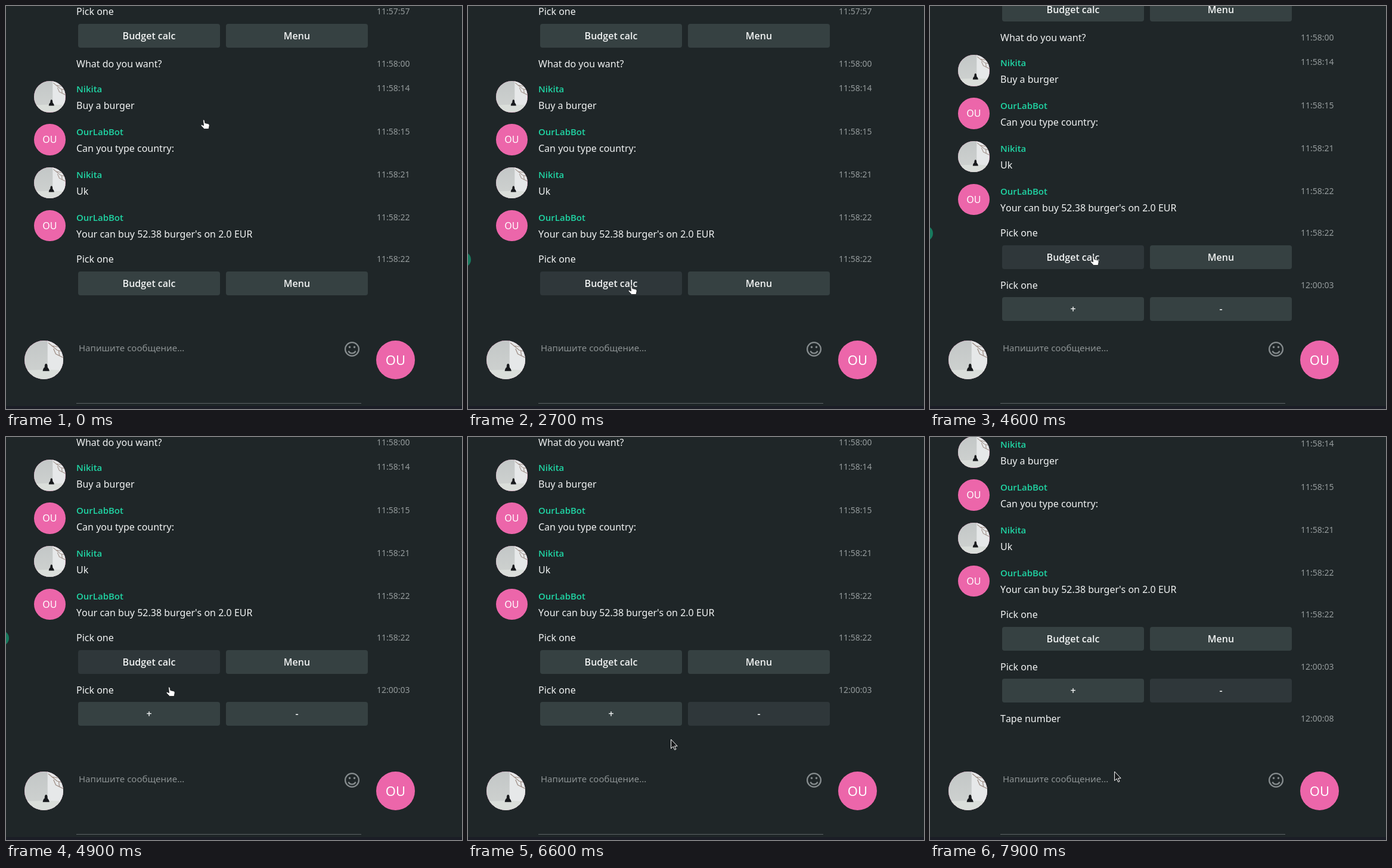
Write an HTML page that moves like this. It is 765 by 677 pixels and loops after 8 s.

```html
<!DOCTYPE html>
<html lang="en">
<head>
<meta charset="utf-8">
<style>
html, body { margin: 0; height: 100%; overflow: hidden; background: #1f2628; }
body { font: 16px "Noto Sans", "Open Sans", sans-serif; font-kerning: none; color: #f1f3f3; }
div, svg { position: absolute; }
div { white-space: nowrap; }
#view { width: 765px; height: 544px; overflow: hidden; }
.msg { left: 118px; margin-top: -11px; }
.name { left: 118px; margin-top: -11px; font: 600 15px "Open Sans", "Noto Sans", sans-serif; color: #20d5a4; }
.time { left: 622px; margin-top: -10px; font-size: 14px; color: #959b9c; }
.hint { left: 122px; margin-top: -11px; font-size: 15px; color: #8d9394; }
.btn { width: 238px; height: 40px; border-radius: 4px; background: #364142; text-align: center;
  font: 600 16px/40px "Open Sans", "Noto Sans", sans-serif; }
.btn.dark { background: #2f373a; }
.face { left: 47px; width: 52.5px; height: 52.5px; border-radius: 50%; overflow: hidden;
  background: #ec66aa; color: #fff; text-align: center; line-height: 52px; }
.big { width: 65px; height: 65px; font-size: 22px; line-height: 64px; }
.face svg { left: 0; width: 100%; height: 100%; }
#check { left: -21px; width: 26px; height: 26px; border-radius: 50%; background: #177a5e; }
</style>
</head>
<body>
<div id="view"><div id="chat"></div></div>
<div id="panel"></div>
<svg width="765" height="677">
  <defs>
    <linearGradient id="wall" x2="0" y2="1">
      <stop stop-color="#c3c7c7"/><stop offset="1" stop-color="#d0d3d1"/>
    </linearGradient>
    <g id="photo">
      <path d="M0 0H52V52H0Z" fill="url(#wall)"/>
      <path d="M31 0H52V41H31Z" fill="#e6e8e9"/>
      <path d="M0 40L31 39L52 40V52H0Z" fill="#dadeda"/>
      <path d="M32 3L44 13L52 15M36 7L48 9M39 11L42 18L52 23M46 14L47 21" fill="none" stroke="#9d8c84"/>
      <path d="M24.5 41Q25 37 27 36Q27 31 29 31Q31 31 31 36Q33 38 33.5 41Z" fill="#181a1d"/>
    </g>
  </defs>
  <g fill="none" stroke="#868c8e" stroke-width="2.3">
    <circle cx="580.5" cy="576.5" r="11.4"/>
    <path d="M574.5 579.5Q576 583.3 580.5 583.3T586.5 579.5"/>
  </g>
  <path d="M576.5 573h.01M584.5 573h.01" stroke="#868c8e" stroke-width="3.6" stroke-linecap="round"/>
  <path d="M118 667.5H596" stroke="#5d6466"/>
  <path d="M0 672H765V677H0Z" fill="#1b1d26"/>
  <path id="hand" d="M3.6 2Q4.8 0 6 2L6.8 6.6L12.6 8Q14.6 8.8 14.2 11L13 16.5H5.4L0 10.8Q.4 8.7 3 10L4.6 11Z" fill="#fff" stroke="#16191a" stroke-width=".8"/>
  <path id="arrow" d="M.6 1V16.3L4.2 13L6.7 18.5L9 17.5L6.6 12.2H11.2Z" fill="#17191b" stroke="#fff"/>
</svg>
<script>
const $ = id => document.getElementById(id);
const text = (cls, y, s) => `<div class="${cls}" style="top:${Math.round(y)}px">${s}</div>`;
const line = (y, msg, time) => text("msg", y, msg) + text("time", y, time);

const PHOTO = `<svg viewBox="0 0 52 52"><use href="#photo"/></svg>`;
const people = [["Nikita", PHOTO], ["OurLabBot", "OU"]];

const signed = ([msg, time], i) => {
  const top = 126 + 72.25 * i, [name, face] = people[i % 2];
  return `<div class="face" style="top:${top}px">${face}</div>` +
    text("name", top + 13.5, name) + text("msg", top + 40.7, msg) + text("time", top + 12.3, time);
};

const pick = (y, time, key, labels, gap = 21) => line(y, "Pick one", time) +
  labels.map((s, i) =>
    `<div class="btn" id="${key + i}" style="left:${121 + 248 * i}px;top:${y + gap}px">${s}</div>`).join("");

const menu = ["Budget calc", "Menu"];
$("chat").innerHTML =
  pick(9, "11:57:57", "old", menu) +
  line(97, "What do you want?", "11:58:00") +
  [
    ["Buy a burger", "11:58:14"],
    ["Can you type country:", "11:58:15"],
    ["Uk", "11:58:21"],
    ["Your can buy 52.38 burger's on 2.0 EUR", "11:58:22"]
  ].map(signed).join("") +
  pick(425, "11:58:22", "menu", menu) +
  `<div id="reply">${pick(513, "12:00:03", "sign", ["+", "-"], 20)}</div>` +
  `<div id="last">${line(600, "Tape number", "12:00:08")}</div>` +
  `<div id="check"></div>`;

$("panel").innerHTML = text("hint", 575, "Напишите сообщение...") +
  people.map(([, face], i) =>
    `<div class="face big" style="left:${31 + 590 * i}px;top:562px">${face}</div>`).join("");

// Pointer moves: start, end, then the place reached.
const moves = [
  [0, 0, 327, 190], [400, 700, 275, 437], [800, 900, 269, 468],
  [2700, 3000, 296, 516], [3000, 3400, 277, 464], [4500, 4600, 269, 419],
  [5000, 5400, 270, 461], [5700, 5900, 436, 479], [6100, 6600, 340, 507],
  [6600, 7000, 328, 509], [7500, 7700, 319, 544], [7800, 7900, 309, 561]
];
const ease = k => k * k * (3 - 2 * k);

function pointer(t) {
  let x = 0, y = 0;
  for (const [from, to, px, py] of moves) {
    if (t < from) break;
    const k = t >= to ? 1 : ease((t - from) / (to - from));
    x += (px - x) * k;
    y += (py - y) * k;
  }
  return [Math.round(x), Math.round(y)];
}

const within = (t, a, b) => t >= a && t < b;
const show = (id, on) => $(id).style.visibility = on ? "visible" : "hidden";
const darken = (id, on) => $(id).classList.toggle("dark", on);

function draw(t) {
  const [x, y] = pointer(t);
  const scroll = 44 * (t >= 4600) + 44 * (t >= 4900) + 39 * (t >= 7700);
  const depth = y + scroll;
  const outside = depth > (t < 3700 ? 490 : 578);
  const row = depth > 508 ? 513 : depth > 405 ? 426 : 213;

  $("chat").style.top = -scroll + "px";
  $("check").style.top = row - 13 + "px";
  for (const id of ["hand", "arrow"]) $(id).setAttribute("transform", `translate(${x} ${y})`);
  show("hand", !outside);
  show("arrow", outside);
  show("check", !outside && t >= 100);
  show("reply", t >= 3700);
  show("last", t >= 7600);
  darken("menu0", within(t, 700, 5100));
  darken("sign0", within(t, 5300, 5900));
  darken("sign1", t >= 5900);
}

function tick() {
  draw(Math.floor(performance.now() % 8000 / 100) * 100);
  requestAnimationFrame(tick);
}
tick();
</script>
</body>
</html>
```
